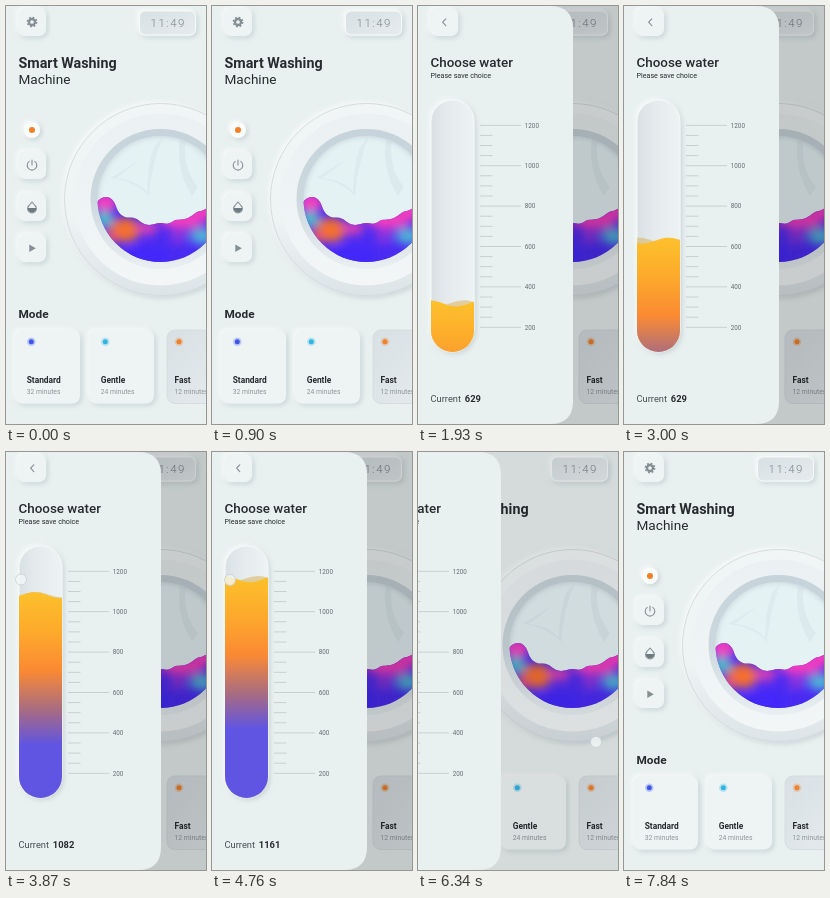
Write an HTML page that moves like this. It is 200 px wide and 418 px high and loops after 7.87 s.

```html
<!DOCTYPE html>
<html lang="en">
<head>
<meta charset="utf-8">
<title>Smart Washing Machine</title>
<style>
  html, body { margin: 0; width: 100%; height: 100%; overflow: hidden; background: #e9f1f0; }
  svg { display: block; width: 200px; height: 418px; font-family: Roboto, "Open Sans", sans-serif; fill: #252b2e; }
  .bold { font-weight: 700; }
  .note { font-size: 6.8px; fill: #8d969b; }
  .name { font-size: 8.4px; font-weight: 700; }
  .face { fill: #eef4f4; filter: url(#raised); }
  .icon { fill: none; stroke: #858e94; stroke-width: 1.1; stroke-linecap: round; stroke-linejoin: round; }
  .scale { font-size: 6.3px; fill: #646c70; }
</style>
</head>
<body>
<svg viewBox="0 0 200 418">
  <defs>
    <filter id="raised" x="-30%" y="-30%" width="160%" height="160%">
      <feDropShadow dx="-2" dy="-2" stdDeviation="2" flood-color="#fff" flood-opacity=".75"/>
      <feDropShadow dx="2" dy="2" stdDeviation="2.4" flood-color="#a9b8bd" flood-opacity=".5"/>
    </filter>
    <filter id="blur5" x="-60%" y="-60%" width="220%" height="220%"><feGaussianBlur stdDeviation="5"/></filter>
    <filter id="blur2" x="-20%" y="-20%" width="140%" height="140%"><feGaussianBlur stdDeviation="2"/></filter>
    <linearGradient id="rim" x1="0" y1="0" x2="0" y2="1">
      <stop offset="0" stop-color="#f1f5f6"/><stop offset=".6" stop-color="#eef3f4"/><stop offset="1" stop-color="#dce4e7"/>
    </linearGradient>
    <linearGradient id="dish" x1="0" y1="0" x2="0" y2="1">
      <stop offset="0" stop-color="#ebf0f2"/><stop offset="1" stop-color="#f2f6f7"/>
    </linearGradient>
    <linearGradient id="bezel" x1="0" y1="0" x2="0" y2="1">
      <stop offset="0" stop-color="#c6d3da"/><stop offset=".5" stop-color="#ccd8de"/><stop offset="1" stop-color="#e9eff2"/>
    </linearGradient>
    <linearGradient id="well" x1="0" y1="0" x2="1" y2="1">
      <stop offset="0" stop-color="#d8e0e3"/><stop offset="1" stop-color="#e6ecee"/>
    </linearGradient>
    <linearGradient id="tube" x1="0" y1="0" x2="1" y2="0">
      <stop offset="0" stop-color="#d9e0e3"/><stop offset=".4" stop-color="#e5ebed"/><stop offset="1" stop-color="#edf2f3"/>
    </linearGradient>
    <linearGradient id="fluid" gradientUnits="userSpaceOnUse" x1="0" y1="0" x2="0" y2="150">
      <stop offset="0" stop-color="#fdbf2b"/><stop offset=".25" stop-color="#fda92c"/><stop offset=".5" stop-color="#fb8a33"/>
      <stop offset=".77" stop-color="#a66b84"/><stop offset="1" stop-color="#6054e2"/>
    </linearGradient>
    <clipPath id="glass"><circle cx="154.500" cy="193" r="63"/></clipPath>
    <clipPath id="tubeClip"><rect x="13" y="94" width="43" height="252" rx="21.500"/></clipPath>
    <clipPath id="waterClip">
      <path d="M88 203C91 193 96 191 101 191C107 192 109 197 111 203C114 209 118 212 124 211.500C132 211 134 217 140 218.500C146 220 149 217 154 217C159 217 161 219 166 216C171 212 176 215 182 212C188 209 190 205 195 205C199 204 201 201 210 200V260H88Z"/>
    </clipPath>
  </defs>

  <rect width="200" height="418" fill="#e9f1f0"/>

  <rect class="face" x="12" y="2" width="28" height="28" rx="7"/>
  <g fill="none" stroke="#858e94">
    <circle cx="26" cy="16" r="3" stroke-width="2.300"/>
    <circle cx="26" cy="16" r="4.600" stroke-width="1.600" stroke-dasharray="1.806"/>
  </g>
  <rect class="face" x="133" y="4.500" width="57" height="25" rx="6"/>
  <rect x="133.500" y="5" width="56" height="24" rx="6" fill="url(#well)" stroke="#f7fafa"/>
  <text x="144.500" y="20.500" font-size="11.500" font-weight="300" letter-spacing="1.500" fill="#7b858c">11:49</text>

  <text class="bold" x="12.500" y="61.500" font-size="14.300">Smart Washing</text>
  <text x="12.500" y="78" font-size="13.600">Machine</text>

  <circle class="face" cx="26" cy="124" r="8" style="fill:#fbfcfc"/>
  <circle cx="26" cy="124" r="3" fill="#f0802a"/>

  <rect class="face" x="12" y="145" width="28" height="28" rx="7"/>
  <path class="icon" d="M23.200 155.400A4.800 4.800 0 1 0 28.800 155.400M26 154V159"/>
  <rect class="face" x="12" y="187" width="28" height="28" rx="7"/>
  <path class="icon" d="M26 196L29 199.500A4.300 4.300 0 1 1 23 199.500Z"/>
  <path d="M21.700 202H30.300A4.300 4.300 0 0 1 21.700 202Z" fill="#6f7980"/>
  <rect class="face" x="12" y="228" width="28" height="28" rx="7"/>
  <path d="M23.300 238.500L29.800 242.300L23.300 246.100Z" fill="#858e94"/>

  <circle cx="154.500" cy="193.500" r="96" fill="url(#rim)" stroke="#d3dbde" filter="url(#raised)"/>
  <circle cx="154.500" cy="193.500" r="86" fill="url(#dish)"/>
  <circle cx="154.500" cy="193" r="70" fill="url(#bezel)"/>
  <circle cx="154.500" cy="193" r="63" fill="#e5f2f4"/>
  <g clip-path="url(#glass)">
    <path d="M157 130C148 143 130 158 104 172C120 173 134 180 143 190C145 168 150 147 157 130Z" fill="#dbe9ed" opacity=".8"/>
    <path d="M152 130C143 146 128 160 110 172C124 173 134 178 141 186C141 166 145 146 152 130Z" fill="#e5f2f4"/>
    <path d="M174 132C171 150 174 171 186 190L192 181C181 168 177 150 180 134Z" fill="#dae8ec" opacity=".8"/>
    <circle cx="154.500" cy="193" r="64" fill="none" stroke="#bccbd3" stroke-width="5" opacity=".6" filter="url(#blur2)"/>
    <g clip-path="url(#waterClip)">
      <rect x="85" y="185" width="120" height="75" fill="#4a2bf2"/>
      <g id="tints" filter="url(#blur5)"></g>
    </g>
  </g>

  <text class="bold" x="12.500" y="312" font-size="11.800">Mode</text>
  <g id="cards"></g>

  <rect id="dim" width="200" height="418" fill="#000" opacity="0"/>

  <g id="panel">
    <path d="M0 0H132Q155 0 155 23V395Q155 418 132 418H0Z" fill="#e9f1f0"/>
    <rect class="face" x="12" y="2" width="28" height="28" rx="7"/>
    <path class="icon" d="M27.800 12.800L24.600 16.200L27.800 19.600"/>
    <text x="12.500" y="60.500" font-size="13.400" font-weight="500">Choose water</text>
    <text x="12.500" y="72" font-size="7.150">Please save choice</text>
    <g id="ruler"></g>
    <rect class="face" x="13" y="94" width="43" height="252" rx="21.500"/>
    <rect x="13" y="94" width="43" height="252" rx="21.500" fill="url(#tube)" stroke="#f6f9fa"/>
    <g clip-path="url(#tubeClip)">
      <path id="back" fill="#d9b45c" opacity=".55"/>
      <path id="front" fill="url(#fluid)"/>
    </g>
    <text x="12.500" y="395.500" font-size="9.300" fill="#454c50">Current</text>
    <text id="count" class="bold" x="46.800" y="395.500" font-size="9.400">629</text>
  </g>

  <circle id="touch" r="5.500" fill="#f2f5f6" fill-opacity=".82" stroke="#c3cccf" stroke-width=".7" opacity="0"/>
</svg>
<script>
const LOOP = 7870;
const $ = id => document.getElementById(id);
const add = (id, markup) => $(id).insertAdjacentHTML('beforeend', markup);

// x, y, rx, ry, colour
[
  [99, 196, 13, 9, '#f53fbd'], [98, 213, 10, 8, '#45bdc9'], [119, 224, 15, 12, '#f4702f'],
  [104, 231, 7, 7, '#e0507c'], [141, 222, 11, 7, '#d93fb4'], [140, 250, 24, 9, '#4328fa'],
  [176, 214, 22, 9, '#f43dbe'], [198, 205, 12, 9, '#f43dbe'], [196, 230, 12, 8, '#4fb6d6'],
  [172, 231, 9, 6, '#8d35dd']
].forEach(([x, y, rx, ry, c]) => add('tints', `<ellipse cx="${x}" cy="${y}" rx="${rx}" ry="${ry}" fill="${c}"/>`));

[
  ['Standard', 32, 9, '#3d55ea'], ['Gentle', 24, 83, '#31b4e4'], ['Fast', 12, 161, '#f0812c']
].forEach(([name, minutes, x, color]) => {
  const fast = name === 'Fast', textX = fast ? 168.500 : x + 11.700, dotX = fast ? 173 : x + 16.300;
  const look = fast ? 'fill="url(#well)" stroke="#d5dde0"' : 'class="face"';
  add('cards', `<rect x="${x}" y="324" width="65" height="73.500" rx="8" ${look}/>
    <circle cx="${dotX}" cy="335.800" r="4.300" fill="${color}" opacity=".28"/>
    <circle cx="${dotX}" cy="335.800" r="2.500" fill="${color}"/>
    <text class="name" x="${textX}" y="377">${name}</text>
    <text class="note" x="${textX}" y="388">${minutes} minutes</text>`);
});

const PX = 0.202;
const levelY = v => 119.3 + (1200 - v) * PX;

for (let i = 0; i <= 20; i++) {
  const v = 1200 - i * 50, y = levelY(v), major = i % 4 === 0;
  add('ruler', `<path d="M62 ${y}H${major ? 103 : 74.500}" stroke="#c4cccf" stroke-width=".9"/>`);
  if (major) add('ruler', `<text class="scale" x="106.800" y="${y + 2.200}">${v}</text>`);
}

const ease = u => u < 0.5 ? 2 * u * u : 1 - 2 * (1 - u) ** 2;

// Eased value at time t from [time, value] steps
function track(steps, t) {
  if (t <= steps[0][0]) return steps[0][1];
  for (let i = 1; i < steps.length; i++) {
    const [t0, a] = steps[i - 1], [t1, b] = steps[i];
    if (t < t1) return a + (b - a) * ease((t - t0) / (t1 - t0));
  }
  return steps[steps.length - 1][1];
}

const OPEN = [[1240, 0], [1520, 1], [6206, 1], [6486, 0]];
const FILL = [[1500, 55], [2400, 629]];
const VALUE = [[3300, 629], [4085, 1161], [4765, 1161], [5500, 629]];
const TOUCHES = [
  { x: [[0, 26]], y: [[0, 201]], show: [[1040, 0], [1120, 1], [1240, 1], [1340, 0]] },
  { x: [[3870, 15], [4700, 18]], y: [[3240, 234], [3860, 127.500], [4760, 128], [5440, 234]],
    show: [[3225, 0], [3290, 1], [5480, 1], [5590, 0]] },
  { x: [[0, 178]], y: [[0, 290]], show: [[6040, 0], [6120, 1], [6360, 1], [6470, 0]] }
];

function wave(y, amp, phase) {
  let d = 'M12 350';
  for (let x = 12; x <= 58; x += 2) d += `L${x} ${(y + amp * Math.sin(x * Math.PI / 26 + phase)).toFixed(2)}`;
  return d + 'L58 350Z';
}

function draw(t) {
  const open = track(OPEN, t);
  $('panel').style.display = open > 0 ? '' : 'none';
  $('panel').setAttribute('transform', `translate(${-155 * (1 - open)} 0)`);
  $('dim').setAttribute('opacity', 0.17 * open);

  const value = track(VALUE, t);
  const y = levelY(t < 2400 ? track(FILL, t) : value);
  const phase = 2.22 * t / 1000 - 7.3;
  $('front').setAttribute('d', wave(y, 3, phase));
  $('back').setAttribute('d', wave(y - 0.5, 2.6, 2.4 - phase));
  $('fluid').setAttribute('gradientTransform', `translate(0 ${y})`);
  $('count').textContent = Math.round(value);

  const active = TOUCHES.find(p => track(p.show, t) > 0);
  $('touch').setAttribute('opacity', active ? track(active.show, t) : 0);
  if (active) {
    $('touch').setAttribute('cx', track(active.x, t));
    $('touch').setAttribute('cy', track(active.y, t));
  }
}

const start = performance.now();
function tick() {
  draw((performance.now() - start) % LOOP);
  requestAnimationFrame(tick);
}
tick();
</script>
</body>
</html>
```
